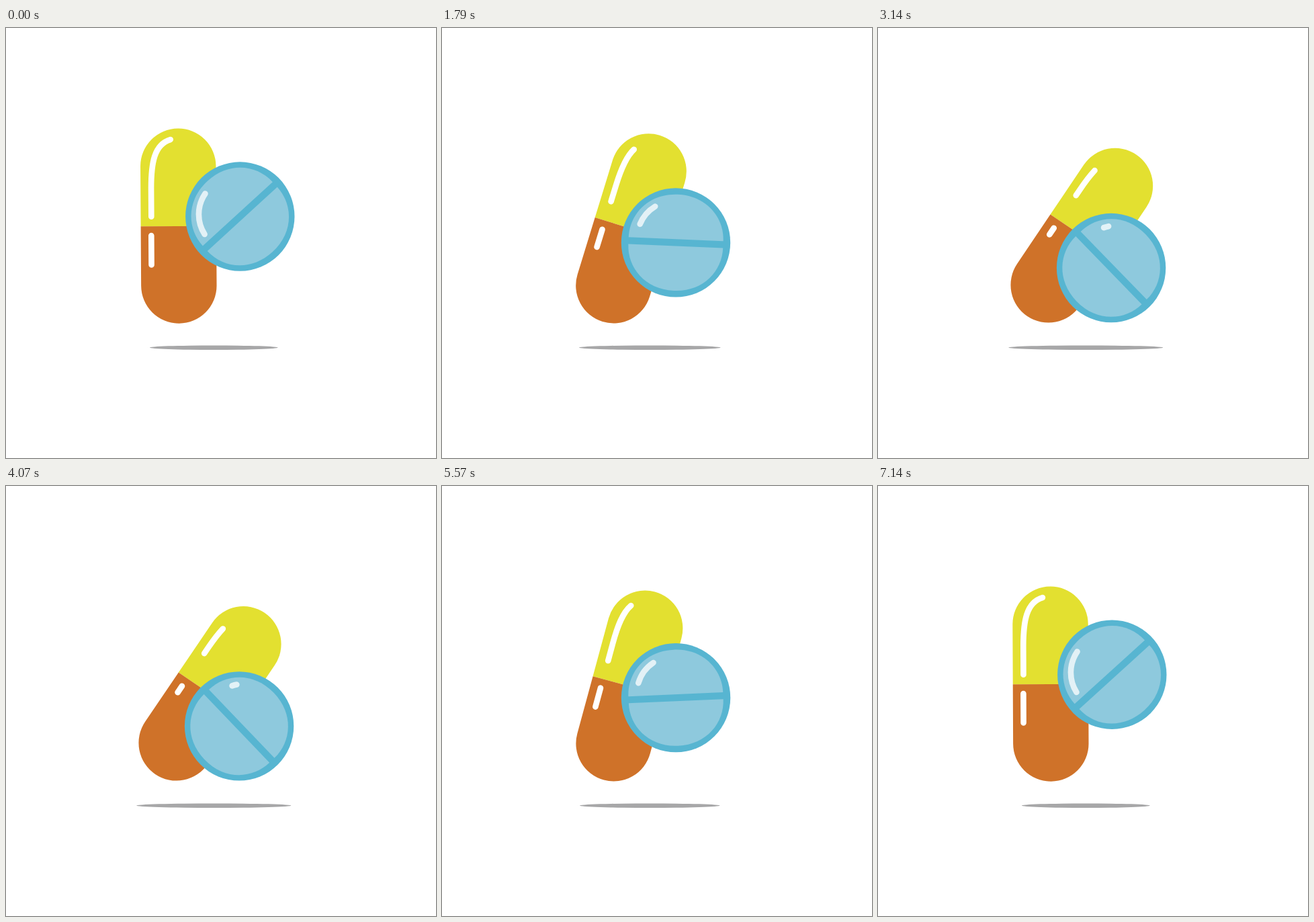
Write an HTML page that moves like this. It is 640 by 640 pixels and loops after 7.21 s.

```html
<!DOCTYPE html>
<html lang="en">
<head>
<meta charset="utf-8">
<title>Capsule and tablet</title>
<style>
  html, body { margin: 0; width: 100%; height: 100%; overflow: hidden; background: #fff; }
  svg { display: block; width: 100%; height: 100%; }
  .shine { fill: none; stroke: #fff; stroke-width: 8.6; stroke-linecap: round; }
</style>
</head>
<body>
<svg viewBox="0 0 640 640">
  <ellipse id="shadow" cx="309.3" cy="475.7" rx="95.3" ry="3.3" fill="#a7a7a8"/>
  <g id="capsule">
    <path fill="#e3e030" d="M201.1 295V205.8a56.2 56.2 0 0 1 112.4 0V295z"/>
    <path fill="#cf7229" d="M201.1 295V383.5a56.2 56.2 0 0 0 112.4 0V295z"/>
    <path id="topShine" class="shine" d="M246 166C222 173 216.9 200 216.9 240V280.5"/>
    <path id="lowShine" class="shine"/>
  </g>
  <g id="tablet">
    <circle r="81.2" fill="#57b5d1"/>
    <g id="halves" fill="#8ec9dd">
      <path id="half" d="M70.5 5.1C70.5 40 43.3 71.6 0 71.6S-70.5 40 -70.5 5.1z"/>
      <use href="#half" transform="rotate(180)"/>
    </g>
    <path id="tabShine" class="shine" stroke-opacity=".75"/>
  </g>
</svg>
<script>
  const LOOP = 7210, FPS = 14, PEAK = 51;
  const el = id => document.getElementById(id);
  const [shadow, capsule, topShine, lowShine, tablet, halves, tabShine] =
    ['shadow', 'capsule', 'topShine', 'lowShine', 'tablet', 'halves', 'tabShine'].map(el);
  const topLength = topShine.getTotalLength();

  // cubic-bezier(2/3, 0, 1/3, 1), solved by bisection
  function ease(x) {
    let lo = 0, hi = 1;
    for (let i = 0; i < 30; i++) {
      const s = (lo + hi) / 2;
      if (2 * s - 3 * s * s + 2 * s ** 3 < x) lo = s; else hi = s;
    }
    return lo * lo * (3 - 2 * lo);
  }

  function polar(r, deg) {
    const a = deg * Math.PI / 180;
    return `${r * Math.cos(a)} ${r * Math.sin(a)}`;
  }

  // p runs from 0 (upright) to 1 (tilted)
  function pose(p) {
    shadow.setAttribute('rx', 95.3 + 20 * p);
    capsule.setAttribute('transform', `rotate(${-0.36 + 34.9 * p} 257.3 377)`);
    topShine.setAttribute('stroke-dasharray', `${topLength - 81 * p} 999`);
    topShine.setAttribute('stroke-dashoffset', -50 * p);
    lowShine.setAttribute('d', `M216.7 308.8V${352.3 - 32.4 * p}`);
    tablet.setAttribute('transform', `translate(${348.3 - 1.25 * p * p} ${280.5 + 77.8 * p})`);
    halves.setAttribute('transform', `rotate(${-42.5 + 89.8 * p})`);
    tabShine.setAttribute('d',
      `M${polar(59 + 2 * p, 153.3 + 108 * p)}A55 55 0 0 1 ${polar(62, 213.3 + 53.9 * p)}`);
  }

  function draw() {
    const t = performance.now() % LOOP;
    const step = Math.min(100, Math.floor((t + 5) * FPS / 1000));
    pose(step <= PEAK ? ease((step + 1) / 52) : 1 - ease((step - PEAK) / 52.1));
    requestAnimationFrame(draw);
  }
  draw();
</script>
</body>
</html>
```
